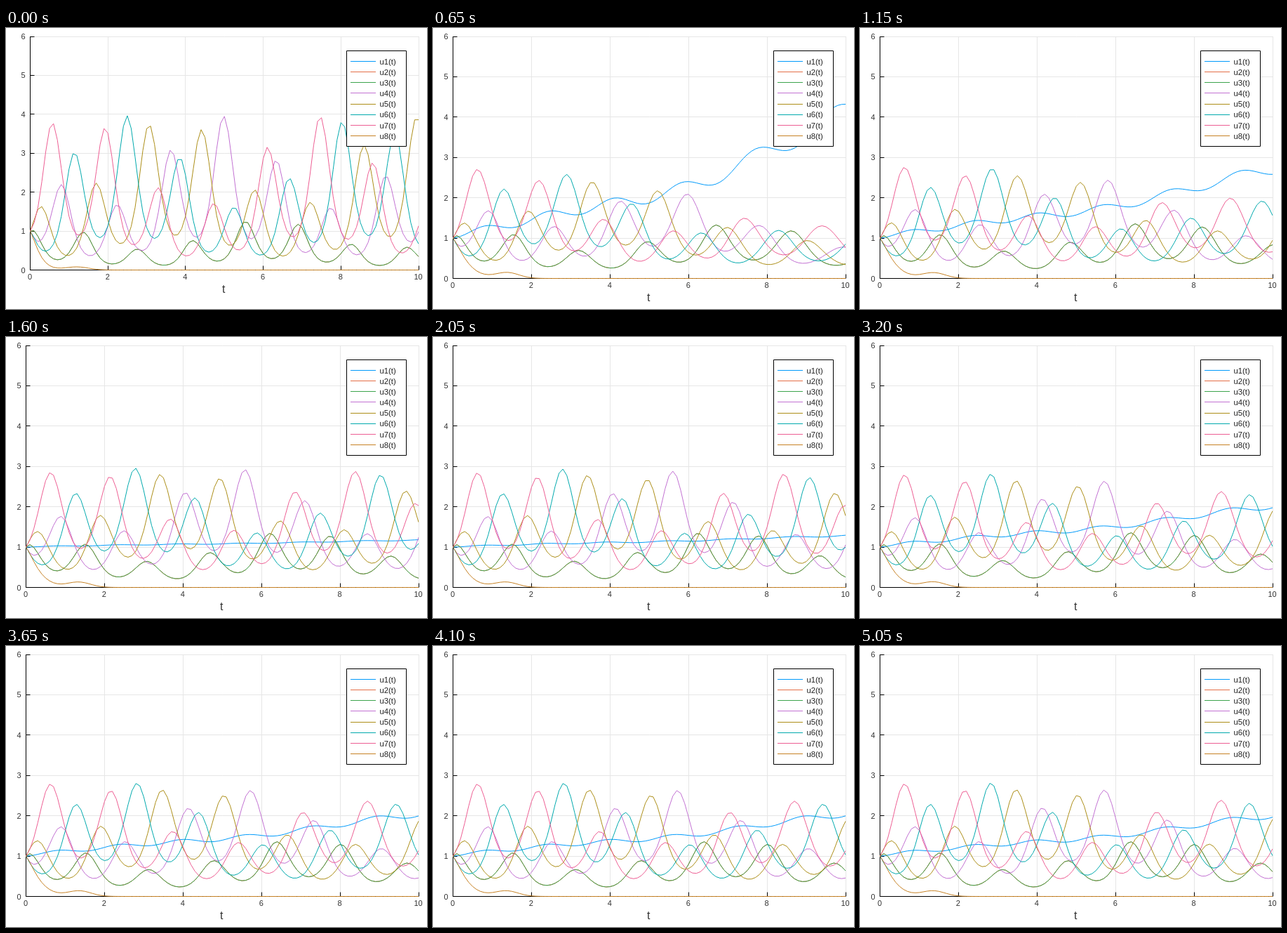
Write an HTML page with a canvas that moves like this. It is 600 px wide and 400 px high and loops after 5100 ms.

```html
<!DOCTYPE html>
<html>
<head>
<meta charset="utf-8">
<style>
html, body { margin: 0; width: 100%; height: 100%; overflow: hidden; background: #fff; }
canvas { display: block; }
</style>
</head>
<body>
<canvas id="c" width="600" height="400"></canvas>
<script>
const ctx = document.getElementById('c').getContext('2d');
const LOOP = 5100, STEP = 50, TAU = 2 * Math.PI;
const FONT = '"Liberation Sans", Arial, sans-serif';
const COLORS = ['#009afa', '#e36f47', '#3da44d', '#c271d2',
                '#ac8e18', '#00a9ad', '#ed5e93', '#c68225'];
// place of u2 ... u7 in the ring of oscillators; u2 and u3 coincide
const RING = [0, 0, 3, 1, 4, 2];

const ease = x => (1 - Math.cos(Math.PI * x)) / 2;

// growth rate of u1 over the training run: rise, overshoot, settle
function rate(ms) {
  if (ms < 650) return .148 - 8.15 * Math.pow(1 - ms / 650, 3);
  if (ms < 1680) return .148 - .1345 * ease(Math.pow((ms - 650) / 1030, 1.33));
  const drift = .002 * Math.max(0, ms - 4100) / 950;
  return .0755 - drift - .062 * Math.exp(-Math.pow((ms - 1680) / 772, 2));
}

// u1 grows in waves that follow the ring's phase k
function growth(s, t, k) {
  const wave = .5 + .5 * Math.sin(TAU * (k - 1.31) / 5);
  const sway = -.4 * Math.sin(.8 * (t - 4)) * Math.sin(Math.PI * t / 10);
  return Math.exp(s * (.9 * t + wave + sway));
}

// oscillator j at phase k: sharp peaks with a slow beat, damped by u1 = v
function ring(j, k, v) {
  const base = 1.31 / (1 + .065 * v * v) * (j ? 1 : .33 + .135 * v);
  const beat = 1 + (.43 - .05 * v) * Math.cos(TAU * (k / 22 - .6 * j));
  const swing = .51 + .24 * Math.exp(-1.4 * v);
  return base * beat * Math.exp(swing * Math.cos(TAU * (k - j) / 5));
}

function decay(t, v) {
  const tau = .27 + .1 * v, mid = 1.2 + .14 * v;
  return Math.exp(-Math.pow(t / tau, 1.3)) +
    (.08 + .05 * v) * Math.exp(-Math.pow((t - mid) / .42, 2));
}

// values of u1 ... u8 at t = 0, 0.1 ... 10
function solve(s) {
  const rows = [], sub = 10, dt = .1 / sub;
  const v1 = Math.min(1.3, growth(s, 1, 3.25));
  const start = RING.map(j => ring(j, 0, growth(s, 0, 0)));
  let k = 0;
  for (let i = 0; i <= 100 * sub; i++) {
    const t = i * dt, v = growth(s, t, k);
    if (i % sub === 0) {
      const fade = Math.exp(-t / .3);
      const mid = RING.map((j, n) => ring(j, k, v) * (1 + (1 / start[n] - 1) * fade));
      rows.push([v, ...mid, decay(t, v1)]);
    }
    k += dt * (3.62 - .385 * v + .01 * v * v);
  }
  return rows;
}

function line(x1, y1, x2, y2, color) {
  ctx.strokeStyle = color;
  ctx.beginPath();
  ctx.moveTo(x1, y1);
  ctx.lineTo(x2, y2);
  ctx.stroke();
}

function text(s, x, y, align, size = 11) {
  ctx.font = size + 'px ' + FONT;
  ctx.textAlign = align;
  ctx.fillText(s, x, y);
}

function draw(ms) {
  const first = ms < STEP;
  const left = first ? 34.5 : 28.5, bottom = first ? 344.5 : 356.5;
  const right = 588, top = 12;
  const X = t => left + (right - left) * t / 10;
  const Y = v => bottom - (bottom - top) * v / 6;
  const snap = v => Math.floor(v) + .5;

  ctx.fillStyle = '#fff';
  ctx.fillRect(0, 0, 600, 400);
  ctx.lineWidth = 1;
  ctx.lineJoin = 'round';
  for (let i = 1; i <= 6; i++) line(left, snap(Y(i)), right, snap(Y(i)), '#e6e6e6');
  for (let i = 2; i <= 10; i += 2) line(snap(X(i)), top, snap(X(i)), bottom, '#e6e6e6');

  line(left, top, left, bottom, '#000');
  line(left, bottom, right, bottom, '#000');
  ctx.fillStyle = '#333';
  ctx.textBaseline = 'middle';
  for (let i = 0; i <= 6; i++) {
    line(left, snap(Y(i)), left + 6, snap(Y(i)), '#000');
    text(i, left - 7, Y(i) + 1, 'right');
  }
  for (let i = 0; i <= 10; i += 2) {
    line(snap(X(i)), bottom, snap(X(i)), bottom - 6, '#000');
    text(i, X(i) - .5, bottom + 10, 'center');
  }
  text('t', (left + right) / 2 - 1, bottom + 28, 'center', 16);

  const rows = solve(rate(ms));
  ctx.save();
  ctx.beginPath();
  ctx.rect(left - .5, top, right - left + 1, bottom - top + 1);
  ctx.clip();
  COLORS.forEach((color, n) => {
    if (first && n === 0) return;
    ctx.strokeStyle = color;
    ctx.beginPath();
    rows.forEach((row, i) => ctx.lineTo(X(i / 10), Y(row[n])));
    ctx.stroke();
  });
  ctx.restore();

  ctx.fillStyle = '#fff';
  ctx.fillRect(485.5, 32.5, 85, 136);
  ctx.strokeStyle = '#000';
  ctx.strokeRect(485.5, 32.5, 85, 136);
  ctx.fillStyle = '#222';
  COLORS.forEach((color, i) => {
    const y = 47.5 + 15.15 * i;
    line(491, snap(y), 527, snap(y), color);
    text('u' + (i + 1) + '(t)', 532.5, y + 1, 'left', 11.3);
  });
}

const start = performance.now();
function tick() {
  const ms = (performance.now() - start) % LOOP;
  draw(Math.floor(ms / STEP) * STEP);
  requestAnimationFrame(tick);
}
tick();
</script>
</body>
</html>
```
